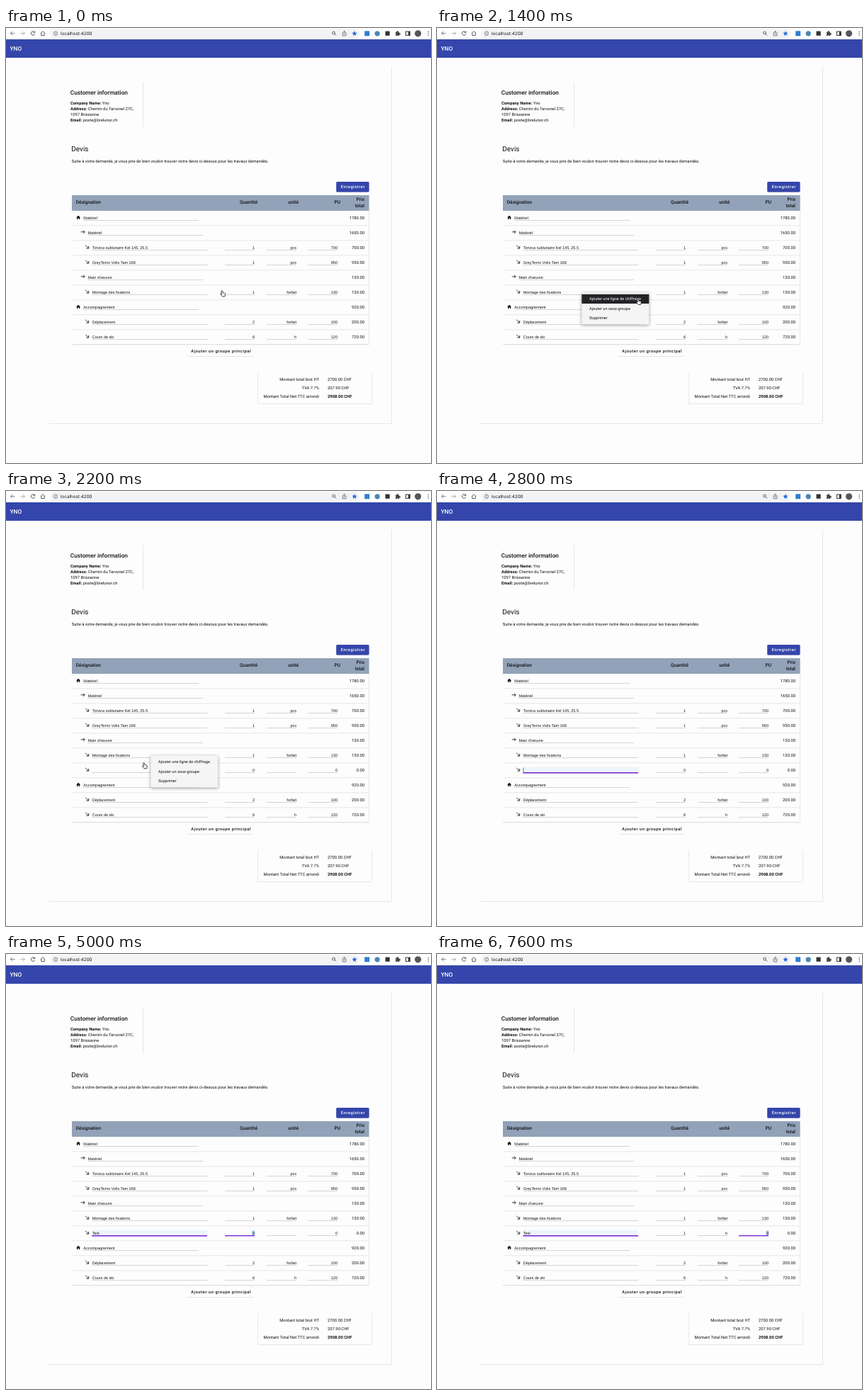
These frames come from a looping animation (600 px wide and 614 px high, 8 s). An HTML page:

```html
<!DOCTYPE html>
<html lang="fr">
<head>
<meta charset="utf-8">
<title>Devis</title>
<style>
html, body { margin: 0; width: 100%; height: 100%; overflow: hidden; background: #fdfdfe; }
svg { display: block; width: 100vw; height: 100vh; }
text { font: 5.83px Roboto, sans-serif; text-rendering: geometricPrecision; white-space: pre; fill: #111; }
.b { font-weight: 500; }
.bb { font-weight: 700; }
.end { text-anchor: end; }
.in { font: 5.5px "Liberation Sans", Arial, sans-serif; }
.th { font-size: 6.6px; font-weight: 500; }
.btn { font-weight: 500; letter-spacing: .52px; }
.menu { font-size: 5.6px; }
.card { fill: #fdfdfe; filter: drop-shadow(0 .7px .5px rgba(0,0,0,.36)); }
.ico { fill: none; stroke: #222; stroke-width: .9; }
.bar { fill: none; stroke: #555a60; stroke-width: 1; }
</style>
</head>
<body>
<svg id="stage" viewBox="0 0 600 614" preserveAspectRatio="none" xmlns="http://www.w3.org/2000/svg"></svg>
<script>
const LOOP = 8000, STEP = 200, ROW = 21, TOP = 258;

const rect = (x, y, w, h, fill, extra = "") =>
  `<rect x="${x}" y="${y}" width="${w}" height="${h}" fill="${fill}" ${extra}/>`;
const text = (x, y, s, cls = "", extra = "") =>
  `<text x="${x}" y="${y}" class="${cls}" ${extra}>${s}</text>`;
const path = (d, cls = "ico", extra = "") => `<path d="${d}" class="${cls}" ${extra}/>`;
const line = (x, y, w) => rect(x, y, w, .55, "#b4b4b6");
const card = (x, y, w, h, id = "") =>
  `<rect class="card" x="${x}" y="${y}" width="${w}" height="${h}" rx="1.6" ${id && `id="${id}"`}/>`;

const rows = [
  { level: 0, name: "Matériel", total: "1780.00" },
  { level: 1, name: "Matériel", total: "1650.00" },
  { level: 2, name: "Torvica sublunaire Kel 145, 25.5", qty: "1", unit: "pcs", price: "700", total: "700.00" },
  { level: 2, name: "GreyTerns Volis Tam 168", qty: "1", unit: "pcs", price: "950", total: "950.00" },
  { level: 1, name: "Main d'oeuvre", total: "130.00" },
  { level: 2, name: "Montage des fixations", qty: "1", unit: "forfait", price: "130", total: "130.00" },
  { level: 0, name: "Accompagnement", total: "920.00" },
  { level: 2, name: "Déplacement", qty: "2", unit: "forfait", price: "100", total: "200.00" },
  { level: 2, name: "Cours de ski", qty: "6", unit: "h", price: "120", total: "720.00" }
];
const ADDED = 6;

const levelIcon = [
  y => path(`M99.2 ${y - .8}L102.1 ${y - 3.5}L105 ${y - .8}H104.2V${y + 1.8}H102.8V${y}H101.4V${y + 1.8}H100V${y - .8}Z`, "", 'fill="#111"'),
  y => path(`M105.7 ${y - 1.4}H111.3M109.1 ${y - 3.4}L111.2 ${y - 1.4}L109.1 ${y + .6}`),
  y => path(`M112.2 ${y - 3.4}L116.6 ${y + .8}M116.7 ${y - 2.3}V${y + .9}H113.4`)
];

// Right edges of the three short inputs, each 42 wide
const field = { qty: 351, unit: 410, price: 468 };

function drawRow(r, i) {
  const y = TOP + i * ROW + 10.2, x = 109 + r.level * 6.2;
  let s = levelIcon[r.level](y) + text(x + .3, y + 1.8, r.name, "in", r.id || "") + line(x, y + 3.2, 163);
  if (r.level === 2) {
    for (const k in field) {
      s += line(field[k] - 42, y + 3.2, 42);
      if (!r.id) s += text(field[k], y + 2, r[k], "in end");
    }
  }
  return s + text(506, y + 2.2, r.total, "end") + rect(93, y + 10.4, 419.5, .6, "#d6d6d8");
}

function browserBar() {
  const g = "#555a60";
  return rect(0, 0, 600, 16, "#fefefe") +
    rect(62, 1.3, 437, 12.8, "#f2f3f5", 'rx="6.4"') +
    path("M12.5 7.6H6.4M9.2 4.8L6.4 7.6L9.2 10.4", "bar", 'opacity=".75"') +
    path("M20.2 7.6H26.3M23.5 4.8L26.3 7.6L23.5 10.4", "bar", 'opacity=".45"') +
    path("M40.3 5.7A2.8 2.8 0 1 0 40.8 8.4M40.7 4.4V6.5H38.5", "bar") +
    path("M48.8 7.6L52 4.6L55.2 7.6M49.8 7V10.6H54.2V7", "bar") +
    `<circle cx="70" cy="7.7" r="2.7" class="bar" style="stroke-width:.7"/>` +
    rect(69.7, 7.2, .7, 2, g) + rect(69.7, 5.9, .7, .7, g) +
    text(77, 9.9, "localhost:4200", "", 'style="font:6.3px Inter,sans-serif"') +
    `<circle cx="462.6" cy="7" r="1.9" class="bar"/>` + path("M464 8.4L466 10.4", "bar") +
    path("M476.2 6.6H475.2V10.8H480V6.6H479M477.6 9V4.2M476.2 5.5L477.6 4.1L479 5.5", "bar", 'style="stroke-width:.8"') +
    path("M492 4.1L493 6.5L495.6 6.7L493.6 8.4L494.2 11L492 9.6L489.8 11L490.4 8.4L488.4 6.7L491 6.5Z", "", 'fill="#2866d8"') +
    rect(506.2, 4.3, 7, 7, "#2f80d0", 'rx=".6"') +
    `<circle cx="524.2" cy="7.8" r="3.6" fill="#4c86b4"/>` +
    rect(535.5, 4.6, 6.2, 6.2, "#333", 'rx=".6"') +
    path("M549.8 5.7H551.6A1.2 1.2 0 1 1 553.8 5.7H555.2V7.2A1.2 1.2 0 1 1 555.2 9.4V11H553.4A1.1 1.1 0 0 0 551.4 11H549.8V9.4A1.1 1.1 0 0 0 549.8 7.3Z", "", 'fill="#444"') +
    rect(564.4, 5, 5.8, 5.4, "none", 'stroke="#333"') + rect(567.8, 5, 2.4, 5.4, "#333") +
    `<circle cx="581.6" cy="7.8" r="4.6" fill="#55565a"/>` +
    [5.2, 7.7, 10.2].map(y => `<circle cx="596.2" cy="${y}" r=".75" fill="${g}"/>`).join("") +
    rect(0, 16, 600, 26, "#3446ab") +
    text(5.5, 31.6, "YNO", "b", 'style="font-size:8.3px;fill:#fff"');
}

function pageHead() {
  return card(85, 76, 108.5, 64) +
    text(90.8, 93.9, "Customer information", "b", 'style="font-size:8.25px"') +
    text(91, 107.6, '<tspan class="bb">Company Name:</tspan> Yno') +
    text(91, 115.7, '<tspan class="bb">Address:</tspan> Chemin du Tarvonel 27C,') +
    text(91, 123.8, "1097 Brissanne") +
    text(91, 131.9, '<tspan class="bb">Email:</tspan> poste@brelunor.ch') +
    text(92.3, 174.2, "Devis", "", 'style="font-size:10px"') +
    text(92.7, 189.7, "Suite à votre demande, je vous prie de bien vouloir trouver notre devis ci-desous pour les travaux demandés.") +
    rect(466.3, 217, 46.2, 14.6, "#3446ab", 'rx="1.6" style="filter:drop-shadow(0 .8px .7px rgba(0,0,0,.4))"') +
    text(472.7, 226.3, "Enregistrer", "btn", 'style="fill:#fff"');
}

function tableHead() {
  return rect(93, 236, 419.5, 22, "#92a2b8") +
    text(98.8, 248.3, "Désignation", "th") +
    text(355, 248.3, "Quantité", "th end") + text(413, 248.3, "unité", "th end") +
    text(472, 248.3, "PU", "th end") +
    text(506, 243.7, "Prix", "th end") + text(506, 252.9, "total", "th end");
}

function foot() {
  const sums = [["Montant total brut HT", "2700.00 CHF"], ["TVA 7.7%", "207.90 CHF"],
    ["Montant Total Net TTC arrondi", "2908.00 CHF"]];
  return card(255, 449, 95, 14.4) + text(261.3, 458.1, "Ajouter un groupe principal", "btn") +
    card(355.3, 486, 161.4, 44.5) +
    sums.map(([label, value], i) => text(442, 498 + i * 12.2, label, "end") +
      text(454, 498 + i * 12.2, value, i === 2 ? "bb" : "")).join("");
}

function addedRow() {
  const y = TOP + ADDED * ROW + 10.2;
  return `<g id="added"><g id="nameFocus">${rect(121.3, 389.6, 162.7, 7.4, "#eef4fb")}</g>` +
    rect(347.3, 390.4, 3.9, 7, "#a9cbf2", 'id="qtySel"') + rect(464.5, 390.4, 3.9, 7, "#a9cbf2", 'id="priceSel"') +
    drawRow({ level: 2, name: "", total: "0.00", id: 'id="name"' }, ADDED) +
    Object.keys(field).map(k => text(field[k], y + 2, "", "in end", `id="${k}"`) +
      rect(field[k] - 42, 397, 42, 1.3, "#7420d0", `id="${k}Line"`)).join("") +
    rect(121.3, 397, 162.7, 1.5, "#7420d0", 'id="nameLine"') +
    rect(0, 390.6, .55, 6.2, "#111", 'id="caret"') + "</g>";
}

function menu() {
  const items = ["Ajouter une ligne de chiffrage", "Ajouter un sous-groupe", "Supprimer"];
  return `<g id="menu">` +
    rect(204.3, 373.2, 95, 45.2, "#f5f5f5", 'rx="1" style="filter:drop-shadow(0 1px 2px rgba(0,0,0,.4))"') +
    rect(204.3, 375.8, 95, 13.2, "#232225", 'id="hover"') +
    items.map((s, i) => text(215, 384.3 + i * 13.4, s, "menu", i ? "" : 'id="firstItem"')).join("") + "</g>";
}

const pointers =
  `<g id="hand">${path("M2 .5Q3-.2 3.4.8L4 3.2L6.4 3.8Q7.6 4.2 7.2 5.8L6.6 8.4H3L.6 5.4Q.1 4.4 1.2 4.4L2.4 5.1L1.7 1.4Z", "", 'fill="#fff" stroke="#111" stroke-width=".8"')}</g>` +
  `<g id="arrow">${path("M0 0V6.5L1.5 5.1L2.5 7.5L3.6 7L2.6 4.7H4.5Z", "", 'fill="#111" stroke="#fff" stroke-width=".5"')}</g>`;

document.getElementById("stage").innerHTML =
  rect(0, 0, 600, 614, "#fdfdfe") + card(61, 53, 483.5, 505.5, "page") + rect(55, 42, 495, 12.5, "#fdfdfe") +
  browserBar() + pageHead() + card(93, 236, 419.5, 210.6, "table") + tableHead() +
  rows.slice(0, ADDED).map(drawRow).join("") +
  `<g id="below">${rows.slice(ADDED).map((r, i) => drawRow(r, i + ADDED)).join("")}${foot()}</g>` +
  addedRow() + menu() + pointers;

const $ = id => document.getElementById(id);
const show = (id, on) => $(id).setAttribute("visibility", on ? "inherit" : "hidden");
const set = (id, s) => { if ($(id).textContent !== s) $(id).textContent = s; };

// Pointer stops: start time, shape, x, y
const stops = [
  [0, "hand", 302.3, 370.5], [200, "arrow", 298.5, 373], [1000, "arrow", 296, 375],
  [1200, "hand", 288, 379], [1400, "hand", 281, 382], [1600, "hand", 275, 383.5],
  [1800, "hand", 272.5, 383.5], [2000, "hand", 262, 384], [2200, "hand", 192, 383.3],
  [2400, "hand", 165, 387], [2600, "", 0, 0]
];

function update(ms) {
  const t = Math.floor(ms / STEP) * STEP;
  const during = (a, b) => t >= a && t < b;
  const grown = t >= 2000, shift = grown ? ROW : 0;

  $("page").setAttribute("height", 505.5 + shift);
  $("table").setAttribute("height", 210.6 + shift);
  $("below").setAttribute("transform", `translate(0 ${shift})`);
  show("added", grown);

  const named = t >= 2600;
  const inQty = during(4600, 5800), inUnit = during(5800, 7600), inPrice = t >= 7600;
  set("name", "Test".slice(0, Math.max(0, (t - 3000) / STEP)));
  set("qty", t < 5400 ? "0" : "1");
  set("unit", t < 6800 ? "" : "h");
  set("price", "0");
  show("nameFocus", grown && named);
  show("nameLine", grown && named);
  show("qtyLine", inQty);
  show("unitLine", inUnit);
  show("priceLine", inPrice);
  show("qtySel", during(4600, 5400));
  show("priceSel", inPrice);

  const nameCaret = during(2600, 4200);
  show("caret", nameCaret || during(5800, 6400) || during(6800, 7200));
  $("caret").setAttribute("x", nameCaret ? 121.7 + $("name").getComputedTextLength() : 410);

  const hover = during(1200, 2200);
  show("menu", during(800, 2400));
  show("hover", during(800, 2400) && hover);
  $("firstItem").style.fill = hover ? "#fff" : "#111";

  const [, shape, x, y] = stops.filter(s => s[0] <= t).pop();
  for (const id of ["hand", "arrow"]) {
    show(id, id === shape);
    $(id).setAttribute("transform", `translate(${x} ${y})`);
  }
}

const start = performance.now();
function frame() {
  update((performance.now() - start) % LOOP);
  requestAnimationFrame(frame);
}
frame();
</script>
</body>
</html>
```
